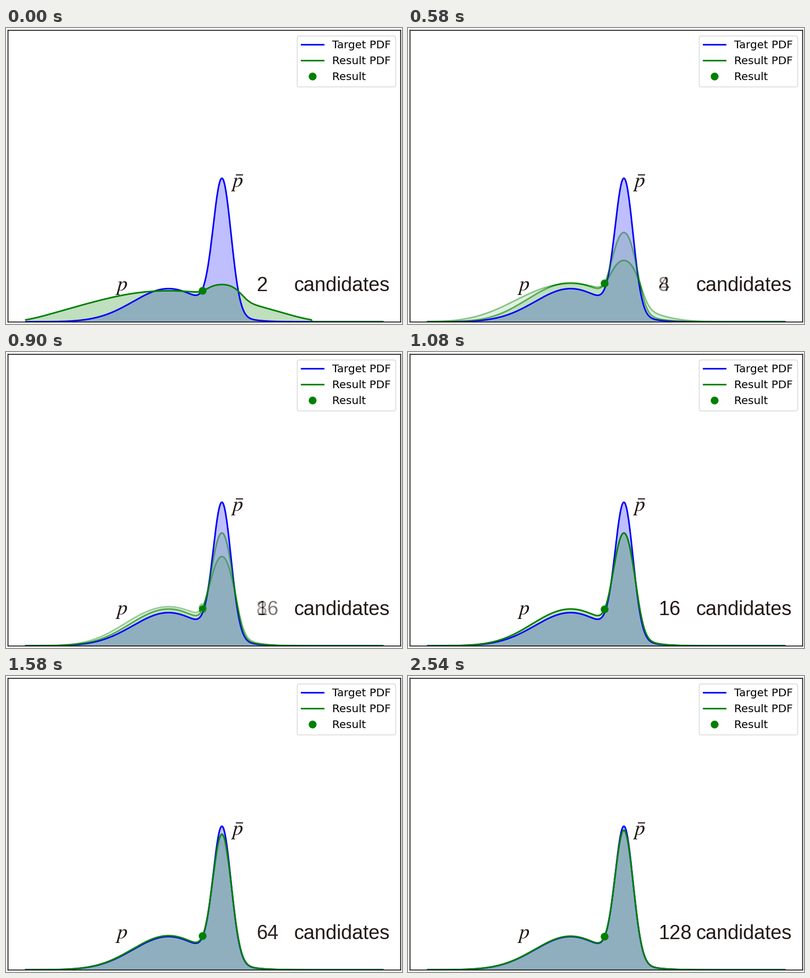
These frames come from a looping animation (720x540 px, 3.7 s). A matplotlib script:

```python
import numpy as np
import matplotlib.pyplot as plt
from matplotlib.animation import FuncAnimation

WIDTH, HEIGHT, DPI = 720, 540, 100
LOOP_MS, STEP_MS = 3700, 20
FIRST_FADE, FADE_PERIOD, FADE_MS = 177, 314, 170
COUNTS = [2, 4, 8, 16, 32, 64, 128]
LEFT, RIGHT, TOP, BOTTOM = 3.6, 717.5, 4.3, 536.4
BASE, INK = 536, "#231815"
SAMPLE = -0.05

plt.rcParams["font.family"] = "DejaVu Sans"
plt.rcParams["mathtext.fontset"] = "stix"

# Data range [-5, 5] with 5 % margins; candidates are uniform on [-5, 3].
x = np.linspace(-5, 5, 651)
support = x <= 3


def to_px(value):
    return (LEFT + RIGHT) / 2 + value * (RIGHT - LEFT) / 11


def normal(mean, sigma):
    return np.exp(-((x - mean) / sigma) ** 2 / 2) / sigma


target = normal(-1, 1) + normal(0.5, 0.25)
target *= 262 / target.max()


def resampled_pdf(count):
    """Density of one sample resampled from `count` uniform candidates.

    E[f / (f + S)] is evaluated as the integral of f exp(-tf) phi(t)^(count-1),
    with phi the Laplace transform of a single candidate weight.
    """
    weight = target[support] / target.max()
    log_t = np.linspace(-14, 18, 640)
    t = np.exp(log_t)
    decay = np.exp(-np.outer(weight, t))
    phi = decay.mean(axis=0)
    chance = weight * (decay @ (t * phi ** (count - 1))) * (log_t[1] - log_t[0])
    pdf = np.zeros_like(x)
    pdf[support] = count * target[support].mean() * chance
    return pdf


def draw_density(ax, heights, color, label):
    ax.fill_between(to_px(x), BASE - heights, BASE, color=color, alpha=0.25, lw=0)
    ax.plot(to_px(x), BASE - heights, color=color, lw=2.05, label=label)


def draw_slide(fig, count):
    ax = fig.add_axes([LEFT / WIDTH, 1 - BOTTOM / HEIGHT,
                       (RIGHT - LEFT) / WIDTH, (BOTTOM - TOP) / HEIGHT])
    ax.set(xlim=(LEFT, RIGHT), ylim=(BOTTOM, TOP), xticks=[], yticks=[])
    for spine in ax.spines.values():
        spine.set(linewidth=1.1, snap=False)

    result = resampled_pdf(count)
    draw_density(ax, target, "blue", "Target PDF")
    draw_density(ax, result, "green", "Result PDF")
    ax.plot(to_px(SAMPLE), BASE - np.interp(SAMPLE, x, result), "o",
            color="green", ms=9.2, zorder=3, label="Result")
    ax.legend(loc="upper right", fontsize=14.35)

    for px, py in ((210.5, 479.5), (420.5, 290)):
        ax.text(px, py, "$p$", size=27.5, color=INK, ha="center", va="baseline")
    ax.plot([418, 431], [268, 268], color=INK, lw=1.4, solid_capstyle="butt")
    for px, words in ((454.8, str(count)), (523.8, "candidates")):
        ax.text(px, 480, words, size=26, color=INK, va="baseline",
                family="Liberation Sans")


def render_slide(fig, count):
    fig.clear()
    draw_slide(fig, count)
    fig.canvas.draw()
    return np.asarray(fig.canvas.buffer_rgba())[..., :3].astype(float)


fig = plt.figure(figsize=(WIDTH / DPI, HEIGHT / DPI), dpi=DPI, facecolor="white")
slides = [render_slide(fig, count) for count in COUNTS]
fig.clear()
stage = fig.add_axes([0, 0, 1, 1])
stage.axis("off")
picture = stage.imshow(slides[0].astype(np.uint8), aspect="auto",
                       interpolation="nearest")


def update(frame):
    elapsed = max(frame * STEP_MS - FIRST_FADE, 0)
    index = min(elapsed // FADE_PERIOD, len(slides) - 2)
    u = min((elapsed - index * FADE_PERIOD) / FADE_MS, 1)
    mix = u * u * (3 - 2 * u)
    blend = (1 - mix) * slides[index] + mix * slides[index + 1]
    picture.set_data(np.round(blend).astype(np.uint8))
    return [picture]


anim = FuncAnimation(fig, update, frames=LOOP_MS // STEP_MS, interval=STEP_MS,
                     repeat=True, repeat_delay=0, blit=False)
plt.show()
```
